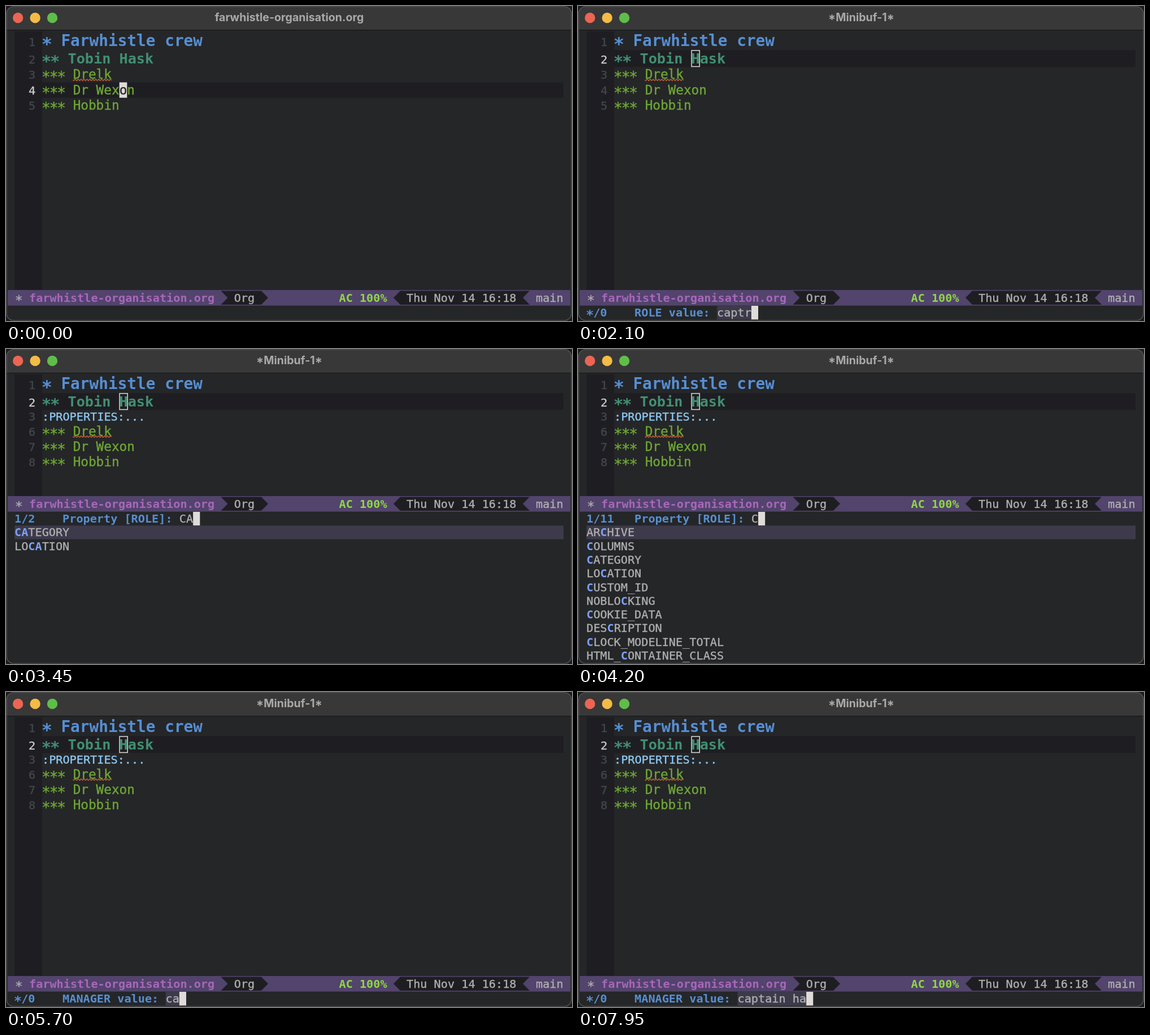
An HTML page with a canvas for the animation above (8 s loop, 1002 by 559 pixels).

```html
<!DOCTYPE html>
<html lang="en">
<head>
<meta charset="utf-8">
<title>Org properties</title>
<style>
  html, body { margin: 0; width: 100%; height: 100%; overflow: hidden; background: #1c1d1e; }
  canvas { display: block; width: 1002px; height: 559px; }
</style>
</head>
<body>
<canvas id="stage"></canvas>
<script>
const W = 1002, H = 559, LOOP = 8000, TICK = 150;
const canvas = document.getElementById('stage');
const ctx = canvas.getContext('2d');
const dpr = window.devicePixelRatio || 1;
canvas.width = W * dpr;
canvas.height = H * dpr;

const MONO = '"DejaVu Sans Mono", "Liberation Mono", monospace';
const BASE = 20.2, ADV = 0.602, CELL = BASE * ADV, LINE = 24.3;
const FILE = 'farwhistle-organisation.org';
const C = {
  outside: '#1c1d1e', bg: '#252628', dark: '#1e1e22', bar: '#52446c', title: '#383838',
  text: '#b0b0b0', bright: '#cfcfcf', num: '#42474f', cursor: '#dfdbd9',
  h1: '#568fd3', h2: '#418f72', h3: '#6fa834', drawer: '#8ecbf5',
  file: '#a867bb', battery: '#8fd745', select: '#3d3a4b', match: '#7aa2fb', wave: '#cf6538'
};

const PROPS = ('STYLE ARCHIVE COLUMNS LOGGING ORDERED SUMMARY CATEGORY LOCATION CUSTOM_ID ' +
  'NOBLOCKING UNNUMBERED VISIBILITY COOKIE_DATA DESCRIPTION EXPORT_DATE EXPORT_TEXT ' +
  'EXPORT_TITLE EXPORT_AUTHOR EXPORT_OPTIONS LOG_INTO_DRAWER REPEAT_TO_STATE ' +
  'EXPORT_FILE_NAME TABLE_EXPORT_FILE TABLE_EXPORT_FORMAT CLOCK_MODELINE_TOTAL ' +
  'HTML_CONTAINER_CLASS ORG-IMAGE-ACTUAL-WIDTH').split(' ');

const HEADS = [
  { text: '* Farwhistle crew', size: 27.75, h: 33, color: C.h1, bold: true },
  { text: '** Tobin Hask', size: 25.2, h: 30, color: C.h2, bold: true }
];
const DRAWER = { text: ':PROPERTIES:...', size: BASE, h: LINE, color: C.drawer };
const CREW = ['*** Drelk', '*** Dr Wexon', '*** Hobbin'].map((text, i) =>
  ({ text, size: 22.7, h: 27.3, color: C.h3, misspelt: i === 0 }));

// Timeline: every entry holds until the next one.
const steps = [];
function run(start, state, inputs) {
  inputs.forEach((input, i) => steps.push({ t: start + i * TICK, ...state, input }));
}
const edit = (row, col, drawer) => ({ mode: 'edit', row, col, drawer });
const ask = (prompt, drawer) => ({ mode: 'prop', prompt: `Property [${prompt}]: `, row: 1, col: 9, drawer });
const value = (prompt, drawer) => ({ mode: 'value', prompt: `${prompt} value: `, row: 1, col: 9, drawer });

run(0, edit(3, 10, false), ['']);
run(150, edit(2, 9, false), ['']);
run(300, edit(1, 9, false), ['']);
run(450, ask('SKILL', false), ['', 'R', 'RO', 'ROL', 'ROLE']);
run(1200, { ...edit(1, 9, false), title: '*Minibuf-1*' }, ['']);
run(1350, value('ROLE', false), ['', 'c', 'ca', 'cap', 'capt', 'captr']);
run(2400, value('ROLE', false), ['capt', 'capta', 'captai', 'captain']);
run(3000, edit(1, 9, true), ['']);
run(3150, ask('ROLE', true), ['', 'C', 'CA', 'CAP', 'CAPT', 'CAP', 'CA', 'C', '',
  'M', 'MA', 'MAN', 'MANA', 'MANAG', 'MANAGE', 'MANAGER']);
run(5550, value('MANAGER', true), ['', 'ca', 'cap', 'capt', 'capta', 'captai']);
run(6600, value('MANAGER', true), ['captaimn']);
run(6900, value('MANAGER', true), ['captaim', 'captai', 'captain', 'captain ', 'captain',
  'captain ', 'captain h', 'captain ha']);

function box(x, y, w, h, color) {
  ctx.fillStyle = color;
  ctx.fillRect(x, y, w, h);
}

function poly(points, color) {
  ctx.fillStyle = color;
  ctx.beginPath();
  points.forEach(([x, y]) => ctx.lineTo(x, y));
  ctx.fill();
}

// A hairline stroke gives regular text a slightly heavier weight.
function glyphs(str, x, y, bold) {
  ctx.fillText(str, x, y);
  if (!bold) ctx.strokeText(str, x, y);
}

// Asterisks sit lower and larger than the font's own.
function put(str, x, y, color, bold = false, size = BASE) {
  const font = s => `${bold ? 'bold ' : ''}${s}px ${MONO}`;
  ctx.fillStyle = ctx.strokeStyle = color;
  ctx.lineWidth = 0.35;
  ctx.textAlign = 'left';
  ctx.font = font(size);
  glyphs(str.replace(/\*/g, ' '), x, y, bold);
  ctx.font = font(size * 1.15);
  [...str].forEach((ch, i) => {
    if (ch === '*') glyphs('*', x + i * size * ADV - size * 0.045, y + size * 0.256, bold);
  });
}

function wave(x, y, w) {
  ctx.strokeStyle = C.wave;
  ctx.lineWidth = 1.3;
  ctx.beginPath();
  for (let i = 0; i <= w; i++) ctx.lineTo(x + i, y + 1.3 * Math.sin(i * Math.PI / 2.6));
  ctx.stroke();
}

function drawWindow(title) {
  ctx.fillStyle = C.bg;
  ctx.beginPath();
  ctx.roundRect(0.5, 0.5, W - 1, H - 1, 13);
  ctx.fill();
  ctx.save();
  ctx.clip();
  box(0, 0, W, 42, C.title);
  box(0, 42, W, 1.5, '#191a1b');
  ctx.restore();
  ctx.strokeStyle = '#5c5d5e';
  ctx.lineWidth = 1.2;
  ctx.beginPath();
  ctx.roundRect(1, 1, W - 2, H - 2, 12.5);
  ctx.stroke();
  ['#ec6553', '#f4bb45', '#5fbd49'].forEach((color, i) => {
    ctx.fillStyle = color;
    ctx.beginPath();
    ctx.arc(21.2 + i * 30.4, 21, 9.2, 0, 7);
    ctx.fill();
  });
  ctx.font = 'bold 19.6px Inter, "Open Sans", sans-serif';
  ctx.textAlign = 'center';
  ctx.fillStyle = '#a9a9a9';
  ctx.fillText(title, 501.5, 27);
}

function drawBuffer(s, bottom) {
  box(15, 45, 49, bottom - 45, C.dark);
  const lines = [...HEADS, ...(s.drawer ? [DRAWER] : []), ...CREW];
  let y = 45.2;
  lines.forEach((line, i) => {
    const here = i === s.row, base = y + line.size * 0.928 + 0.2;
    const cw = line.size * ADV, cx = 64 + s.col * cw;
    const num = s.drawer && i > 2 ? i + 3 : i + 1;
    if (here) box(64, y, 923, line.h, C.dark);
    put(String(num), 40, base, here ? C.bright : C.num);
    put(line.text, 64, base, line.color, line.bold, line.size);
    if (line.misspelt) wave(64 + 4 * cw, base + 1.7, 5 * cw);
    if (here && s.mode === 'edit') {
      box(cx, y, cw, line.h, C.cursor);
      put(line.text[s.col] || '', cx, base, C.bg, line.bold, line.size);
    } else if (here) {
      ctx.strokeStyle = C.cursor;
      ctx.lineWidth = 1.5;
      ctx.strokeRect(cx + 0.5, y + 0.75, cw - 1, line.h - 1.5);
    }
    y += line.h;
  });
}

function drawModeline(y) {
  const top = y + 1.5, mid = y + 13.8, low = y + 26, base = y + 21.3;
  box(3, y, 996, 27.6, C.bar);
  poly([[380.5, top], [452, top], [464, mid], [452, low], [380.5, low], [392.5, mid]], C.dark);
  poly([[698, top], [927, top], [915, mid], [927, low], [698, low], [686, mid]], C.dark);
  put('*', 16.7, base, C.text);
  put(FILE, 41, base, C.file, true);
  put('Org', 403.7, base, C.text);
  put('AC 100%', 589.5, base, C.battery, true);
  put('Thu Nov 14 16:18', 709, base, C.text);
  put('main', 938, base, C.text);
}

function drawMinibuffer(s, top) {
  const list = s.mode === 'prop' ? PROPS.filter(p => p.includes(s.input)) : [];
  const head = (list.length ? '1/' + list.length : '*/0').padEnd(7) + s.prompt;
  const x = 15 + head.length * CELL, w = s.input.length * CELL, base = top + 19;
  put(head, 15, base, C.h1, true);
  if (!list.length) box(x, top, w, LINE, C.select);
  put(s.input, x, base, C.text);
  box(x + w, top, CELL, LINE, C.cursor);
  list.slice(0, 10).forEach((name, i) => {
    const y = top + (i + 1) * LINE, at = name.indexOf(s.input), end = at + s.input.length;
    if (i === 0) box(15, y, 972, LINE, C.select);
    put(name.slice(0, at), 15, y + 19, C.text);
    put(s.input, 15 + at * CELL, y + 19, C.match, true);
    put(name.slice(end), 15 + end * CELL, y + 19, C.text);
  });
}

function draw(time) {
  const s = steps.findLast(step => step.t <= time);
  const bar = s.mode === 'prop' ? 261 : 504;
  ctx.setTransform(dpr, 0, 0, dpr, 0, 0);
  box(0, 0, W, H, C.outside);
  drawWindow(s.title || (s.mode === 'edit' ? FILE : '*Minibuf-1*'));
  drawBuffer(s, bar);
  drawModeline(bar);
  if (s.mode !== 'edit') drawMinibuffer(s, bar + 28);
}

const start = performance.now();
function frame() {
  draw((performance.now() - start) % LOOP);
  requestAnimationFrame(frame);
}
frame();
</script>
</body>
</html>
```
